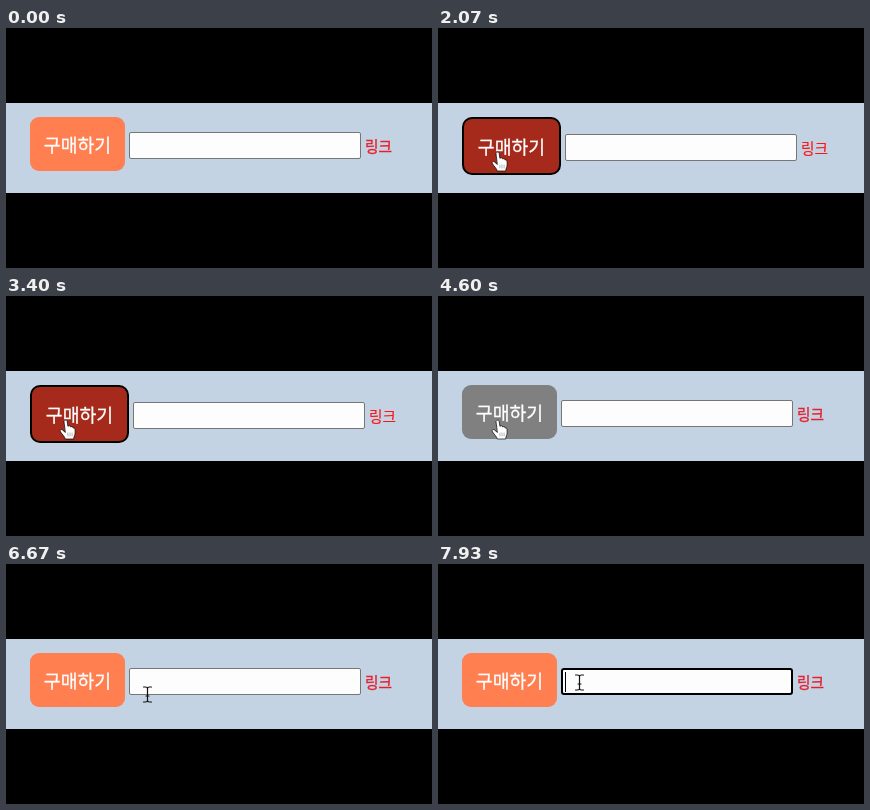
Animation of 426 by 240 pixels, one loop 8 s. Source, as an HTML page:

```html
<!DOCTYPE html>
<html lang="ko">
<head>
<meta charset="utf-8">
<style>
  html, body { margin: 0; width: 100%; height: 100%; overflow: hidden; background: #000; }
  svg { display: block; width: 100vw; height: 100vh; }
  text { font-family: "Noto Sans CJK KR", "Noto Sans CJK", sans-serif; }
  #label { font-size: 18.3px; fill: #fff; stroke: #fff; stroke-width: .3; text-anchor: middle; }
  #link { font-size: 14.7px; }
  .cursor { stroke-linejoin: round; stroke-linecap: round; }
</style>
</head>
<body>
<svg viewBox="0 0 426 240">
  <defs><clipPath id="band"><rect y="75" width="426" height="90"/></clipPath></defs>
  <rect width="426" height="240"/>
  <g clip-path="url(#band)">
    <rect y="75" width="426" height="90" fill="#c3d3e4"/>
    <rect id="button"/>
    <text id="label" x="71.5" y="124.2">구매하기</text>
    <g id="rest">
      <rect id="field" fill="#fdfdfd"/>
      <rect id="caret" x="127" y="108" width="1" height="20"/>
      <text id="link" x="359" y="124">링크</text>
    </g>
    <g id="cursor" class="cursor">
      <g id="hand" fill="#fff" stroke="#000" stroke-width=".7">
        <path d="M-1.5 1.5C-1.5-.4 1.5-.4 1.7 1.5L2.4 6.3C3.5 5.3 5 5.7 5.2 7C6.3 6.2 7.5 6.9 7.7 8C9 7.5 9.6 8.6 9.6 10V13C9.6 15 8.4 16 8.2 19H-.3C-.6 16.6-3.2 14.7-5 11.8C-6.2 9.8-4.1 8.8-2.8 10.2L-.4 12.2Z"/>
        <path d="M2.4 13v3M4.5 13v3M6.6 13v3" fill="none" stroke-width=".3"/>
      </g>
      <path id="arrow" d="M.5.5V14.2L3.7 11.2L5.9 16.5L8.3 15.5L6.1 10.4H10.5Z" fill="#fff" stroke="#000" stroke-width=".8"/>
      <path id="beam" d="M-4-7.5H-2Q0-7.5 0-6Q0-7.5 2-7.5H4M0-6V6M-4 7.5H-2Q0 7.5 0 6Q0 7.5 2 7.5H4M-1.5 1.5H1.5" fill="none" stroke="#111" stroke-width="1.2"/>
    </g>
  </g>
</svg>
<script>
const LOOP = 8000, FPS = 15;
const PRESS = 1530, RELEASE = 4130, FOCUS = 7400, BLINK = 500;

// Pointer waypoints: time, x, y
const route = [
  [400, 66, 168], [950, 59.5, 124], [4850, 59.5, 124],
  [5450, 139, 147], [6100, 139, 147], [6550, 141.5, 130.5],
  [6850, 141.5, 130.5], [7200, 141.5, 118.5], [LOOP, 141.5, 118.5]
];

const $ = id => document.getElementById(id);
const set = (id, attrs) => {
  for (const name in attrs) $(id).setAttribute(name, attrs[name]);
};
const show = (id, visible) => set(id, { visibility: visible ? "inherit" : "hidden" });
const inside = ([x, y], left, top, right, bottom) =>
  x >= left && x <= right && y >= top && y <= bottom;

function pointerAt(t) {
  const i = route.findIndex(point => point[0] > t);
  if (i < 1) return route[0].slice(1);
  const [t0, x0, y0] = route[i - 1], [t1, x1, y1] = route[i];
  const u = (t - t0) / (t1 - t0), ease = u * u * (3 - 2 * u);
  return [x0 + (x1 - x0) * ease, y0 + (y1 - y0) * ease];
}

// Stroked box given by its outer edges
function box(id, x, y, width, height, radius, border, stroke) {
  set(id, {
    x: x + border / 2, y: y + border / 2,
    width: width - border, height: height - border,
    rx: radius, stroke, "stroke-width": border
  });
}

function draw(t) {
  const pointer = pointerAt(t);
  const overButton = inside(pointer, 24, 89, 119, 143);
  const overField = inside(pointer, 123, 104, 355, 131);
  const pressed = t >= PRESS && t < RELEASE;
  const focused = t >= FOCUS;

  const grow = pressed ? 4 : 0;
  box("button", 24, 89, 95 + grow, 54 + grow, 9, grow / 2, "#000");
  set("button", { fill: pressed ? "#a52a1c" : overButton ? "#808080" : "#ff7f50" });
  set("label", { transform: `translate(${grow / 2} ${grow / 2})` });
  set("rest", { transform: `translate(${grow} ${grow / 2})` });

  if (focused) box("field", 123, 104, 232, 27, 2, 2, "#000");
  else box("field", 123, 104, 232, 27, 1.5, 1, "#767676");
  show("caret", focused && (t - FOCUS) % (2 * BLINK) < BLINK + 60);

  const red = pressed ? "#ff1414" : "#e8202c";
  set("link", { fill: red, stroke: red, "stroke-width": pressed ? 0.15 : 0.35 });

  set("cursor", { transform: `translate(${pointer})` });
  show("cursor", t >= route[0][0]);
  show("hand", overButton);
  show("beam", overField);
  show("arrow", !overButton && !overField);
}

function tick() {
  const t = performance.now() % LOOP;
  draw(Math.floor(t * FPS / 1000 + 0.05) * 1000 / FPS);
  requestAnimationFrame(tick);
}
tick();
</script>
</body>
</html>
```
